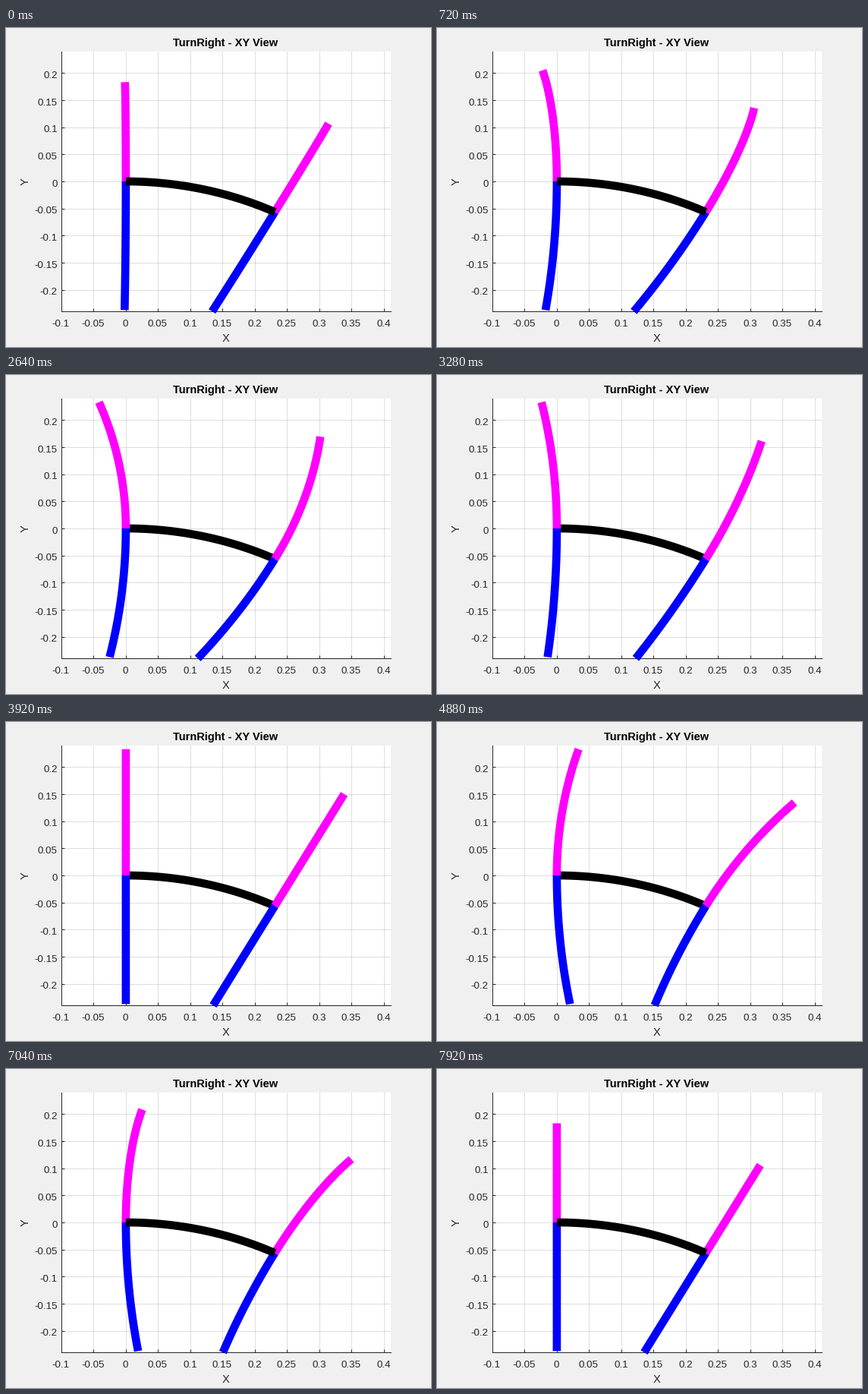
Write a matplotlib script that moves like this. It is 560 px wide and 420 px high and loops after 8000 ms.

```python
import numpy as np
import matplotlib.pyplot as plt
from matplotlib.animation import FuncAnimation

W, H, DPI = 560, 420, 80
PT = 72 / DPI                       # points per pixel
FRAMES, INTERVAL = 100, 80

LENGTH = 0.24                       # limb and body length
BODY_BEND = 0.48
STANCE_BEND, SWING_BEND = 0.417, 1.24
LOWER_BEND = 0.25
XLIM, YLIM = (-0.1, 0.4105), (-0.24, 0.24)
LEFT, RIGHT, TOP, BOTTOM = 72.9, 506.8, 30.85, 373.15
DARK = "#262626"

plt.rcParams["font.family"] = "Liberation Sans"
plt.rcParams["axes.unicode_minus"] = False

fig = plt.figure(figsize=(W / DPI, H / DPI), dpi=DPI, facecolor="#f0f0f0")
ax = fig.add_axes([LEFT / W, 1 - BOTTOM / H, (RIGHT - LEFT) / W, (BOTTOM - TOP) / H])
ax.set(xlim=XLIM, ylim=YLIM, facecolor="white")
s = np.linspace(0, 1, 50)


def label(x, y, text, size, **kw):
    fig.text(x / W, 1 - y / H, text, fontsize=size * PT, **kw)


def draw_axes():
    ax.set_axisbelow(True)
    ax.spines[["top", "right"]].set_visible(False)
    for side in ("left", "bottom"):
        ax.spines[side].set(color=DARK, linewidth=PT)
    xticks = np.arange(-2, 9) * 0.05
    yticks = np.arange(-4, 5) * 0.05
    ax.set_xticks(xticks, [])
    ax.set_yticks(yticks, [])
    ax.tick_params(direction="in", length=4.3 * PT, width=PT, color=DARK)
    ax.grid(True, color=DARK, alpha=0.15, linewidth=PT)

    for x in xticks:
        px = LEFT + (x - XLIM[0]) / (XLIM[1] - XLIM[0]) * (RIGHT - LEFT)
        label(px - 0.5, 393, f"{round(x, 2) + 0:g}", 13.33, color=DARK, ha="center")
    for y in yticks:
        py = BOTTOM - (y - YLIM[0]) / (YLIM[1] - YLIM[0]) * (BOTTOM - TOP)
        label(67.8, py + 6.65, f"{round(y, 2) + 0:g}", 13.33, color=DARK, ha="right")

    label(289.8, 413, "X", 14.67, color=DARK, ha="center")
    label(25.5, 202, "Y", 14.67, color=DARK, ha="center", va="center", rotation=90)
    label(289.3, 24, "TurnRight - XY View", 14.67, color="black", ha="center",
          weight="bold")


def reach(bend, t=1.0):
    """Sideways offset of a constant-curvature arc at fraction t."""
    return LENGTH * (1 - np.cos(bend * t)) / bend


def height(bend, t=1.0):
    return LENGTH * np.sin(bend * t) / bend


def upper_pose(phase):
    """Bend angle and the in-plane share of the bend."""
    c, lean = np.cos(phase), np.sin(phase)
    if c <= 0:
        return STANCE_BEND, lean
    bend = STANCE_BEND + (SWING_BEND - STANCE_BEND) * c ** 2
    lean *= (1 - 0.55 * c ** 4) * reach(STANCE_BEND) / reach(bend)
    return bend, lean


def place(x, y, base, turn):
    c, k = np.cos(turn), np.sin(turn)
    return base[0] + x * c + y * k, base[1] - x * k + y * c


def clip_floor(x, y):
    """Cut a falling path where it meets the lower limit."""
    low = np.flatnonzero(y < YLIM[0])
    if low.size == 0:
        return x, y
    i = low[0]
    f = (YLIM[0] - y[i - 1]) / (y[i] - y[i - 1])
    end = x[i - 1] + f * (x[i] - x[i - 1])
    return np.append(x[:i], end), np.append(y[:i], YLIM[0])


def thick(color, z):
    return ax.plot([], [], color=color, lw=10.67 * PT, zorder=z, clip_on=False,
                   solid_capstyle="butt", solid_joinstyle="round", snap=False)[0]


draw_axes()
body = thick("black", 4)
body.set_data(height(BODY_BEND, s), -reach(BODY_BEND, s))
tail = (height(BODY_BEND), -reach(BODY_BEND))
hips = [((0, 0), 0), (tail, BODY_BEND)]
uppers = [thick("magenta", 3) for _ in hips]
lowers = [thick("blue", 3) for _ in hips]


def update(n):
    phase = 2 * np.pi * (n + 1) / FRAMES
    bend, lean = upper_pose(phase)
    z = 5 if np.cos(phase) < -1e-9 else 3
    for upper, lower, (base, turn) in zip(uppers, lowers, hips):
        upper.set_data(*place(-lean * reach(bend, s), height(bend, s), base, turn))
        x, y = place(-np.sin(phase) * reach(LOWER_BEND, s), -height(LOWER_BEND, s),
                     base, turn)
        lower.set_data(*clip_floor(x, y))
        upper.set_zorder(z)
        lower.set_zorder(z)
    return uppers + lowers


anim = FuncAnimation(fig, update, frames=FRAMES, interval=INTERVAL, repeat=True,
                     repeat_delay=0, blit=False)
plt.show()
```
